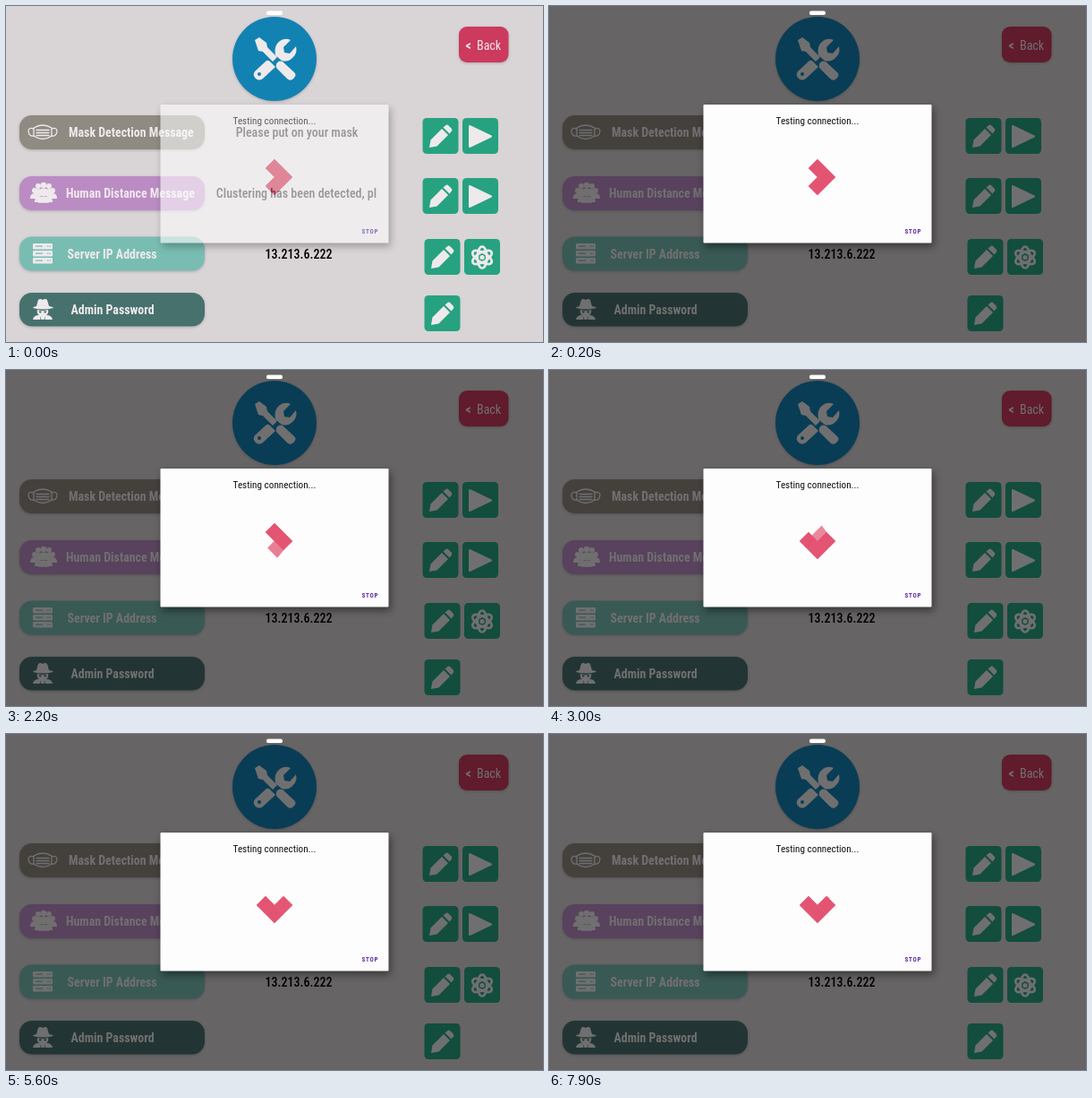
Write an HTML page that moves like this. It is 600 by 375 pixels and loops after 8 s.

```html
<!DOCTYPE html>
<html lang="en">
<head>
<meta charset="utf-8">
<title>Testing connection</title>
<style>
  html, body { margin: 0; width: 100%; height: 100%; overflow: hidden; background: #676364; }
  svg { display: block; width: 100%; height: 100%; }
  svg { --icon: #eeeaec; --green: #27a280; --blue: #1282b3; --olive: #8f8a82;
        --purple: #bb8cc4; --teal: #79bdb2; --dark: #47716d; }
  text { font-family: "Roboto Condensed", Roboto, sans-serif; font-stretch: 75%; }
  .label { font-size: 13.9px; font-weight: 700; fill: var(--icon); }
  .value { font-size: 14px; font-weight: 500; text-anchor: middle; }
  .icon { fill: var(--icon); }
  .line { fill: none; stroke: var(--icon); stroke-linecap: round; }
  .raised { filter: drop-shadow(0 1.5px 1.5px rgba(0, 0, 0, .2)); }
  .modal { filter: drop-shadow(2px 4px 4px rgba(0, 0, 0, .45)); }
</style>
</head>
<body>
<svg viewBox="0 0 600 375" preserveAspectRatio="none">
  <defs>
    <g id="pencil" class="icon">
      <path d="M-12.5 12.5L-11 4L1.5 -8.5L8.5 -1.5L-4 11Z"/>
      <path d="M3 -10L6 -12.5Q7.5 -13.5 9 -12L12 -9Q13.5 -7.5 12.5 -6L10 -3Z"/>
    </g>
    <path id="play" class="icon" stroke="var(--icon)" stroke-width="2" stroke-linejoin="round" d="M-12 -11.5L12 0L-12 11.5Z"/>
    <g id="atom">
      <g class="line" stroke-width="2.7">
        <ellipse rx="12" ry="5.3" transform="rotate(30)"/>
        <ellipse rx="12" ry="5.3" transform="rotate(90)"/>
        <ellipse rx="12" ry="5.3" transform="rotate(150)"/>
      </g>
      <circle class="icon" r="2.6"/>
    </g>
  </defs>

  <rect width="600" height="375" fill="#d9d4d6"/>

  <circle class="raised" cx="300" cy="59" r="47" fill="var(--blue)"/>
  <g transform="translate(300 59)">
    <g class="icon">
      <path d="M-22 -21L-17 -24L-9 -18L-8 -13L3 -2L-2 3L-13 -8L-18 -9Z"/>
      <path d="M2 6Q4 1 9 3L22 15Q25 18 22 21L20 23Q17 25 14 22L3 11Q1 9 2 6Z"/>
      <path d="M-5 3L1 9L-13 22Q-17 25 -21 22Q-25 18 -22 14L-9 2Q-7 1 -5 3Z"/>
      <path d="M1 -4Q-1 -15 6 -20Q12 -24 18 -21L10 -13L11 -7L17 -6L24 -14Q26 -6 20 -1Q15 4 8 2Z"/>
    </g>
    <circle cx="-17" cy="17" r="2" fill="var(--blue)"/>
  </g>

  <rect class="raised" x="506" y="23" width="55.5" height="40" rx="9" fill="#cc3a5e"/>
  <text class="icon" x="513.5" y="49" font-size="14" font-weight="600">&lt;</text>
  <text class="icon" x="526" y="49" font-size="14">Back</text>

  <g id="pills"></g>

  <g class="line" stroke-width="1.3">
    <path d="M31 136Q41 130 51 136V145Q41 152 31 145Z"/>
    <path d="M31 137Q25 135 25 140Q26 146 31 145M51 137Q57 135 57 140Q56 146 51 145M34 138.5H48M34 141.5H48M34 144.5H48"/>
  </g>
  <g id="people" class="icon"></g>
  <g id="server"></g>
  <g class="icon">
    <path d="M34 335L36 328Q38 326 41 328Q44 326 46 328L48 335Q53 336 53 337Q41 340 30 337Q30 336 34 335Z"/>
    <path d="M35 339Q41 341 47 339Q48 343 45 345Q51 345 52 350H30Q31 345 37 345Q34 343 35 339Z"/>
  </g>
  <path d="M36.5 340.5H40L39 342.5H37.5ZM42 340.5H45.5L44.5 342.5H43ZM38 346L39.5 350H38.5ZM44 346L42.5 350H43.5Z" fill="var(--dark)"/>

  <g id="buttons"></g>

  <text class="value" x="325" y="146">Please put on your mask</text>
  <text class="value" x="324.5" y="214">Clustering has been detected, pl</text>
  <text class="value" x="327" y="282">13.213.6.222</text>

  <rect id="dim" width="600" height="375"/>

  <g id="dialog">
    <rect class="modal" x="172.5" y="110" width="255" height="154.5" rx="1" fill="#fefdfe"/>
    <text x="300" y="132.3" font-size="11.2" text-anchor="middle" fill="#111">Testing connection...</text>
    <g id="cubes" fill="#e35472" stroke="#e35472" stroke-width=".6"></g>
    <text x="397.5" y="254" font-size="7" font-weight="700" letter-spacing=".8" fill="#5729a5" style="font-stretch:100%">STOP</text>
  </g>
  <rect x="291" y="5.5" width="18" height="4.5" rx="1.8" fill="#fff"/>
</svg>
<script>
const LOOP = 8000, STEP = 100, CYCLE = 2400;
const $ = id => document.getElementById(id);

const pills = [
  ['olive', 122, 38, 70, 'Mask Detection Message'],
  ['purple', 190, 38, 67, 'Human Distance Message'],
  ['teal', 257.5, 38, 68.5, 'Server IP Address'],
  ['dark', 320, 37.5, 72.5, 'Admin Password']
];
$('pills').innerHTML = pills.map(([color, y, h, x, label]) =>
  `<rect class="raised" x="15" y="${y}" width="207" height="${h}" rx="14" fill="var(--${color})"/>
   <text class="label" x="${x}" y="${y + h / 2 + 5}">${label}</text>`).join('');

const buttons = [
  [465.5, 125, 'pencil'], [510, 125, 'play'], [465.5, 192, 'pencil'], [510, 192, 'play'],
  [467.5, 260, 'pencil'], [512, 260, 'atom'], [467.5, 323, 'pencil']
];
$('buttons').innerHTML = buttons.map(([x, y, icon]) =>
  `<rect x="${x}" y="${y}" width="40" height="40" rx="4.5" fill="var(--green)"/>
   <use href="#${icon}" x="${x + 20}" y="${y + 20.5}"/>`).join('');

const person = (x, y, r) => `<circle cx="${x}" cy="${y}" r="${r}"/>
  <path d="M${x - r * 1.7} ${y + r * 3}Q${x - r * 1.7} ${y + r} ${x} ${y + r}Q${x + r * 1.7} ${y + r} ${x + r * 1.7} ${y + r * 3}Z"/>`;
$('people').innerHTML = [[36, 201, 3], [48, 201, 3], [42, 200, 3.3], [32, 206, 3], [52, 206, 3], [37, 210, 3], [47, 210, 3], [42, 209, 3.6]]
  .map(p => person(...p)).join('');

$('server').innerHTML = [265, 273, 281].map(y =>
  `<rect class="icon" x="30" y="${y}" width="22" height="6.5" rx="1.2"/>
   <path d="M33 ${y + 3.2}h8M46 ${y + 3.2}h1.4M48.5 ${y + 3.2}h1.4" stroke="var(--teal)" stroke-width="1.2"/>`).join('');

$('cubes').innerHTML = '<polygon/>'.repeat(4);
const cubes = [...$('cubes').children];

const clamp = v => Math.max(0, Math.min(1, v));

// A square opens about its first edge, rests, then closes over its second edge.
function drawCube(cube, i, time) {
  const local = ((time - 300 * i) % CYCLE + CYCLE) % CYCLE;
  const shown = clamp((local - 240) / 360), closed = clamp((local - 1800) / 360);
  const tiltX = (1 - shown) * Math.PI, tiltY = closed * Math.PI;
  const side = 10 * Math.SQRT2, turn = Math.PI / 4 + i * Math.PI / 2;
  const points = [[0, 0], [-side, 0], [-side, -side], [0, -side]].map(([x, y]) => {
    const depth = -x * Math.sin(tiltY) - y * Math.sin(tiltX);
    const scale = 140 / (140 - depth);
    const px = x * Math.cos(tiltY) * scale, py = y * Math.cos(tiltX) * scale;
    return [300 + px * Math.cos(turn) - py * Math.sin(turn),
            191 + px * Math.sin(turn) + py * Math.cos(turn)].map(v => v.toFixed(2));
  });
  cube.setAttribute('points', points.join(' '));
  cube.setAttribute('opacity', shown * (1 - closed));
}

function render(now) {
  const step = Math.floor(now % LOOP / STEP), t = step * STEP;
  $('dim').setAttribute('opacity', [0, .25][step] ?? .525);
  $('dialog').setAttribute('opacity', [.6, .92][step] ?? 1);
  // The spinner waits in its first pose until the dialog has opened.
  const spin = t < 300 ? 1200 : t + 1310;
  cubes.forEach((cube, i) => drawCube(cube, i, spin));
}

const start = performance.now();
function tick() {
  render(performance.now() - start);
  requestAnimationFrame(tick);
}
tick();
</script>
</body>
</html>
```
